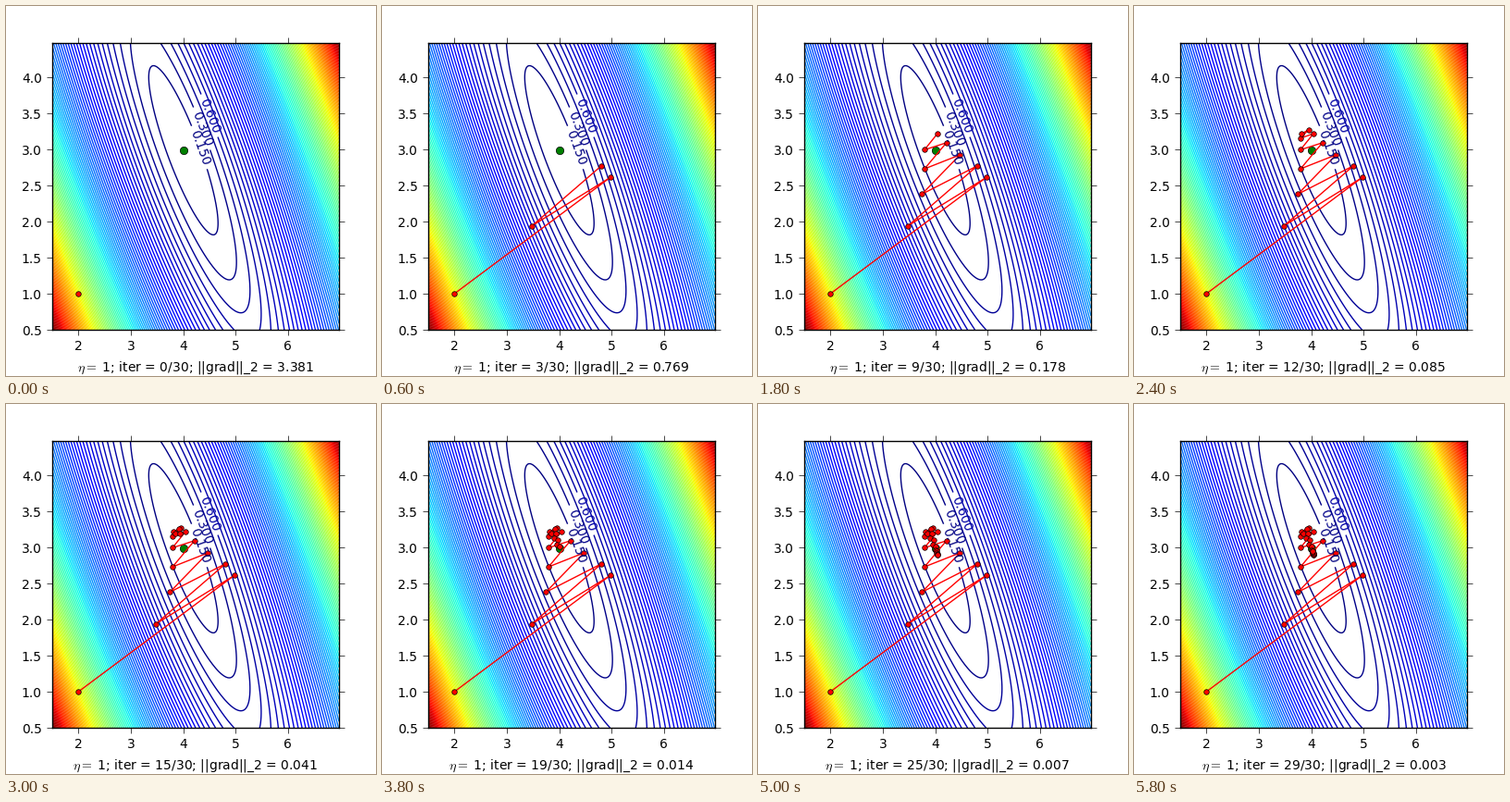
These frames come from a looping animation (400x400 px, 6 s). A matplotlib script:

```python
import numpy as np
import matplotlib.pyplot as plt
from matplotlib.animation import FuncAnimation

plt.rcParams.update({
    "font.family": "DejaVu Sans",
    "font.size": 10,
    "mathtext.fontset": "cm",
    "path.simplify": False,
})

STEPS = 30
ETA, MOMENTUM = 1, 0.9
H = np.array([[1.0, 0.4873], [0.4873, 0.3185]])   # Hessian of the loss
BEST = np.array([4.004, 2.988])
FLOOR = 0.0385                                    # loss at the optimum


def loss(x, y):
    dx, dy = x - BEST[0], y - BEST[1]
    return FLOOR + H[0, 0] * dx**2 + 2 * H[0, 1] * dx * dy + H[1, 1] * dy**2


def grad(w):
    return H @ (w - BEST)


def descend(start):
    """Nesterov accelerated gradient descent."""
    w, v = np.array(start, float), np.zeros(2)
    path = [w]
    for _ in range(STEPS - 1):
        v = MOMENTUM * v - ETA * grad(w + MOMENTUM * v)
        w = w + v
        path.append(w)
    return np.array(path)


path = descend((2, 1))
norms = [np.linalg.norm(grad(w)) for w in path]

fig = plt.figure(figsize=(4, 4), dpi=100, facecolor="white")
ax = fig.add_axes([0.125, 0.125, 0.775, 0.775])

xs, ys = np.arange(1.5, 7, 0.025), np.arange(0.5, 4.5, 0.025)
ax.set_xlim(xs[0], xs[-1])
ax.set_ylim(ys[0], ys[-1])
ax.set_xticks(range(2, 7))
ax.set_yticks(np.arange(0.5, 4.1, 0.5))
ax.tick_params(direction="out", length=4, width=0.5, pad=4, top=True, right=True)
for spine in ax.spines.values():
    spine.set_linewidth(1)

X, Y = np.meshgrid(xs, ys)
contours = ax.contour(X, Y, loss(X, Y), levels=0.15 * np.arange(1, 96),
                      cmap="jet", linewidths=1)
ax.clabel(contours, fmt="%1.3f", fontsize=10, inline=True,
          manual=[(4.322, 3.030), (4.362, 3.290), (4.510, 3.470)])

dot = dict(marker="o", markeredgecolor="black", markeredgewidth=0.5)
ax.plot(*BEST, color="green", markersize=6, **dot)
trail, = ax.plot([], [], color="red", linewidth=1, markersize=4, **dot)
caption = fig.text(205 / 400, 5 / 400, "", ha="center", va="baseline")


def update(k):
    trail.set_data(path[:k + 1, 0], path[:k + 1, 1])
    caption.set_text(rf"$\eta =$ {ETA}; iter = {k}/{STEPS}; "
                     f"||grad||_2 = {norms[k]:.3f}")
    return trail, caption


anim = FuncAnimation(fig, update, frames=STEPS, interval=200,
                     repeat=True, repeat_delay=0, blit=False)
plt.show()
```
